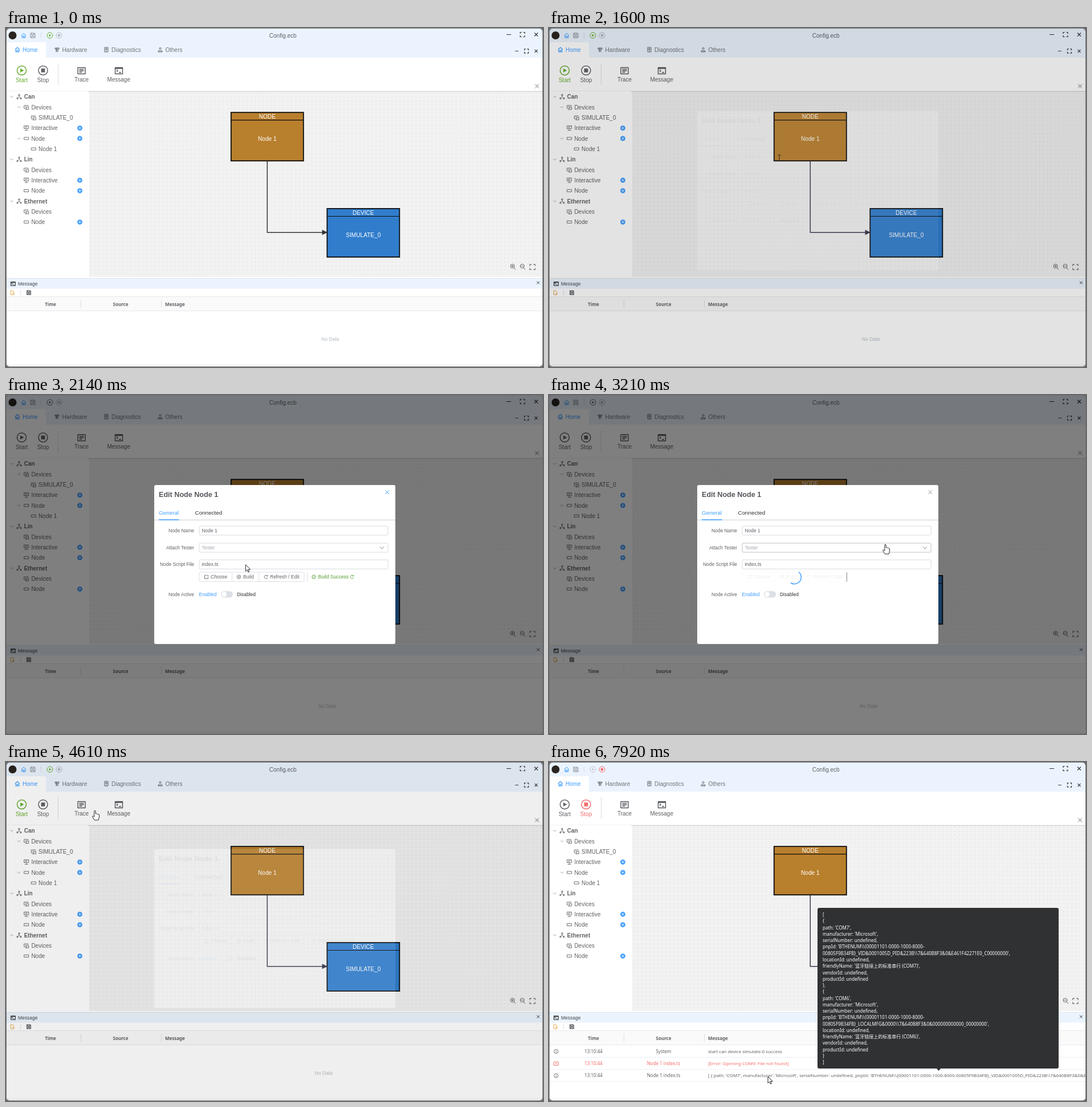
These frames come from a looping animation (942 px wide and 595 px high, 8000 ms). An HTML page:

```html
<!DOCTYPE html>
<html lang="en">
<head>
<meta charset="utf-8">
<title>Config</title>
<style>
html,body{margin:0;width:100%;height:100%;overflow:hidden;background:#777}
svg{display:block;width:100%;height:100%;font-family:"Liberation Sans",Arial,sans-serif}
.tbl{font-family:"Noto Sans","Noto Sans CJK SC",sans-serif}
.ln{fill:none;stroke:currentColor;stroke-linejoin:round}
</style>
</head>
<body>
<svg id="stage" viewBox="0 0 942 595"></svg>
<script>
const LOOP = 8000;
const BLUE = '#409eff', GREEN = '#67ae2f', RED = '#f56c6c', GRAY = '#606266', DARK = '#303133';
const $ = id => document.getElementById(id);

// ---- markup helpers ----
const esc = s => s.replace(/&/g, '&amp;');
const text = (x, y, s, size = 10, fill = GRAY, more = '') =>
  `<text x="${x}" y="${y + size * .36}" font-size="${size}" fill="${fill}" ${more}>${esc(s)}</text>`;
const mid = (x, y, s, size, fill, more = '') => text(x, y, s, size, fill, 'text-anchor="middle" ' + more);
const rect = (x, y, w, h, fill, more = '') =>
  `<rect x="${x}" y="${y}" width="${w}" height="${h}" fill="${fill}" ${more}/>`;
const line = (d, color, w = 1, more = '') => `<path d="${d}" fill="none" stroke="${color}" stroke-width="${w}" ${more}/>`;
const group = (id, body, more = '') => `<g id="${id}" ${more}>${body}</g>`;

// ---- icons, drawn around 0,0 ----
const ICONS = {
  home: 'M-4 0L0-4 4 0M-3-1V4H3V-1M-1 4V1H1V4',
  save: 'M-4-4H3L4-3V4H-4ZM-2-4V-1H2V-4M-2 4V1H2V4',
  tool: 'M-4-3H3V-1H-4ZM-2-1V4M1-1V4M-1-3V4',
  diag: 'M-3-4H3V4H-3ZM-1-2H1V0H-1ZM-1 2H1',
  user: 'M-1.6-2A1.6 1.6 0 1 0 1.6-2A1.6 1.6 0 1 0-1.6-2M-3.5 4V2H3.5V4Z',
  trace: 'M-6.5-5.5H6.5V5.5H-6.5ZM-4-2.5H4M-4 0H4M-4 2.5H1',
  term: 'M-6.5-5.5H6.5V5.5H-6.5ZM-6.5-4H6.5M-4-2L-2 0-4 2M0 3H4',
  net: 'M0-3V0L-3 3M0 0L3 3M-1-4H1V-2H-1ZM-4 2H-2V4H-4ZM2 2H4V4H2Z',
  dev: 'M-1 2H-4V-3H3V-1M-2 4H0M0 0H4V4H0ZM-2-1H0',
  inter: 'M-4-4H4V1H-4ZM-2-2H2M0 1V3M-3 4H3M-2 0L0-2',
  node: 'M-4-2H4V2H-4Z',
  down: 'M-2.5-1.2L0 1.3 2.5-1.2',
  x: 'M-3-3L3 3M3-3L-3 3',
  min: 'M-4 0H4',
  full: 'M-4-1.5V-4H-1.5M1.5-4H4V-1.5M4 1.5V4H1.5M-1.5 4H-4V1.5',
  pin: 'M-4 4L4-4M-4-4L4 4M-1-3L3 1M-3-1L1 3',
  zin: 'M3-1A3.5 3.5 0 1 0-4-1A3.5 3.5 0 1 0 3-1M2 2L5 5M-2.5-1H1.5M-.5-3V1',
  zout: 'M3-1A3.5 3.5 0 1 0-4-1A3.5 3.5 0 1 0 3-1M2 2L5 5M-2.5-1H1.5',
  file: 'M-3-4H1L3-2V4H-3ZM0 2H4',
  folder: 'M0-3H-3V3H3V0M1-3H3V-1',
  wheel: 'M-3.2 0A3.2 3.2 0 1 0 3.2 0A3.2 3.2 0 1 0-3.2 0M0-1V1.5M-1.5 0H1.5',
  redo: 'M2.5-1.5A2.9 2.9 0 1 0 2.8 1M2.8-3.5V-1.3H.8',
  ok: 'M-3.2 0A3.2 3.2 0 1 0 3.2 0A3.2 3.2 0 1 0-3.2 0M-1.5 0L-.3 1.2 1.7-1',
  info: 'M-3.6 0A3.6 3.6 0 1 0 3.6 0A3.6 3.6 0 1 0-3.6 0M0-2V-1.2M0-.5V2',
  err: 'M-4-3H4V3H-4ZM-1.3-1.3L1.3 1.3M1.3-1.3L-1.3 1.3'
};
const icon = (name, x, y, color = GRAY, w = 1, k = 1) =>
  `<path class="ln" d="${ICONS[name]}" transform="translate(${x} ${y}) scale(${k})" color="${color}" stroke-width="${w}"/>`;
const play = (x, y, r) => `<circle class="ln" cx="${x}" cy="${y}" r="${r}" stroke-width="${r > 6 ? 1.5 : 1}"/>` +
  `<path d="M${x - r * .3} ${y - r * .45}L${x + r * .5} ${y}L${x - r * .3} ${y + r * .45}Z" fill="currentColor"/>`;
const stop = (x, y, r) => `<circle class="ln" cx="${x}" cy="${y}" r="${r}" stroke-width="${r > 6 ? 1.5 : 1}"/>` +
  rect(x - r * .42, y - r * .42, r * .84, r * .84, 'currentColor');

// ---- window parts ----
function header() {
  return rect(1, 1, 940, 51, '#ebf4fe', 'rx="5"') + rect(1, 45, 940, 66, '#fff') + rect(70, 44, 871, 8, '#ebf4fe') +
    rect(1, 25, 69, 28, '#fff', 'rx="3"') +
    '<circle cx="11.5" cy="13" r="7" fill="#2a2420"/>' +
    icon('home', 31, 13, BLUE) + icon('save', 47, 13, '#8a8d93') + line('M61.5 8V18', '#d5dae0') +
    group('miniPlay', play(77, 13, 5)) + group('miniStop', stop(93, 13, 5)) +
    mid(485.7, 13, 'Config.ecb') +
    icon('min', 882, 11.5, DARK) + icon('full', 906, 11.5, DARK, 1.2) + icon('x', 930, 11.5, DARK, 1.1) +
    icon('min', 896, 40.5, DARK, 1.2, .75) + icon('full', 913, 40.5, DARK, 1.2, .9) + icon('x', 930, 40.5, DARK, 1.3, .85) +
    icon('home', 20, 38, BLUE, 1.1) + text(29, 38, 'Home', 10, BLUE) +
    icon('tool', 90, 38) + text(98.5, 38, 'Hardware', 10.1, '#73767a') +
    icon('diag', 176, 38) + text(185, 38, 'Diagnostics', 10, '#73767a') +
    icon('user', 270.5, 38) + text(279.5, 38, 'Others', 10, '#73767a') +
    group('start', play(27.5, 74.5, 8) + mid(27.5, 91.5, 'Start', 10, 'currentColor')) +
    group('stop', stop(65, 74.5, 8) + mid(65, 91.5, 'Stop', 10, 'currentColor')) +
    line('M91.5 62V100', '#dcdfe6') +
    icon('trace', 132.5, 75, '#55575c', 1.4) + mid(132.5, 90.5, 'Trace', 10) +
    icon('term', 198, 75, '#55575c', 1.4) + mid(197.7, 90.5, 'Message', 10) +
    icon('pin', 931.5, 102, '#8a8d93', .8);
}

function sidebar() {
  // depth, icon, label, flags: v = arrow, + = add button
  const rows = [
    [0, 'net', 'Can', 'v'], [1, 'dev', 'Devices', 'v'], [2, 'dev', 'SIMULATE_0', ''], [1, 'inter', 'Interactive', '+'],
    [1, 'node', 'Node', 'v+'], [2, 'node', 'Node 1', ''], [0, 'net', 'Lin', 'v'], [1, 'dev', 'Devices', ''],
    [1, 'inter', 'Interactive', '+'], [1, 'node', 'Node', '+'], [0, 'net', 'Ethernet', 'v'], [1, 'dev', 'Devices', ''],
    [1, 'node', 'Node', '+']];
  return rect(1, 111, 143, 328, '#fff') + rows.map(([d, ic, label, f], i) => {
    const y = 120.6 + i * 18.33, x = 23 + d * 12.7;
    return (f.includes('v') ? icon('down', x - 13, y, '#a0a3a9') : '') + icon(ic, x, y, GRAY, .9) +
      text(x + 8.7, y, label, 10, GRAY, d ? '' : 'font-weight="bold"') +
      (f.includes('+') ? `<circle cx="129.5" cy="${y}" r="4.4" fill="${BLUE}"/>` + line(`M127 ${y}H132M129.5 ${y - 2.5}V${y + 2.5}`, '#fff', .8) : '');
  }).join('');
}

const block = (x, y, fill, head, name) =>
  rect(x, y, 127, 85, fill, 'stroke="#0c0c0c" stroke-width="1.8"') + line(`M${x} ${y + 13.5}H${x + 127}`, '#0c0c0c', 1.2) +
  mid(x + 63.5, y + 7, head, 10.1, '#fff') + mid(x + 63.5, y + 46.6, name, 10.1, '#fff');

function canvas() {
  return rect(144, 111, 797, 328, '#fff') + rect(146, 112, 795, 325, '#f2f2f2') + rect(146, 112, 795, 325, 'url(#dots)') +
    line('M1 111.3H941', '#c4c4c4') + line('M143.5 112V439', '#dcdfe6') +
    `<g id="link">${line('M458.3 233V358.8H556', 'currentColor', 1.5)}<path d="M554.5 354.3L564 358.8L554.5 363.3Z" fill="currentColor"/></g>` +
    block(394.8, 148.2, '#b87f2d', 'NODE', 'Node 1') + block(563.3, 317, '#317dcc', 'DEVICE', 'SIMULATE_0') +
    group('bounds', rect(387, 140, 143, 101, 'none', 'stroke="#33334f" stroke-width=".6" stroke-dasharray="3.5 3.5"')) +
    icon('zin', 889, 419, GRAY) + icon('zout', 906, 419, GRAY) + icon('full', 923.5, 419.5, GRAY, 1, 1.15);
}

const PORT = "BTHENUM\\\\{00001101-0000-1000-8000-";
const TAIL = "00805F9B34FB}_VID&0001005D_PID&223B\\\\7&640B8F3&0&E461F42271E0_C00000000'";

function messages() {
  const row = (id, y, ic, color, source, msg) => group(id, icon(ic, 12.5, y, color, .9) +
    mid(78, y, '13:10:44', 8, color) + mid(201, y, source, 8, color) + text(279, y, msg, 7.95, color) +
    line(`M1 ${y + 10.3}H941`, '#ebeef5'));
  return rect(1, 439, 940, 155, '#fff') + rect(1, 440, 940, 17.5, '#ebf4fe') + line('M1 439.5H941', '#dfe3e8') +
    icon('term', 12.5, 449, DARK, 1.8, .6) + text(21, 449, 'Message', 8.5, '#45474c') + icon('x', 933.5, 447, DARK, 1.2, .8) +
    icon('file', 11, 464.5, '#e6a23c', 1, .9) + line('M25.5 460V469', '#dcdfe6') + icon('save', 40, 464.5, '#55575c', 1.4, .85) +
    rect(1, 472, 940, 25, '#fafafa') + line('M1 471.5H941M1 496.5H941', '#e6e8ee') + line('M131.5 477V491M272.5 477V491', '#dcdfe6') +
    '<g class="tbl">' + mid(78, 485, 'Time', 8, GRAY, 'font-weight="bold"') + mid(201, 485, 'Source', 8, GRAY, 'font-weight="bold"') +
    text(279, 485, 'Message', 8, GRAY, 'font-weight="bold"') +
    row('row0', 508, 'info', GRAY, 'System', 'start can device simulate-0 success') +
    row('row1', 529.3, 'err', RED, 'Node 1 index.ts', '[Error: Opening COM9: File not found]') +
    row('row2', 550.5, 'info', GRAY, 'Node 1 index.ts',
      "[ { path: 'COM7', manufacturer: 'Microsoft', serialNumber: undefined, pnpId: '" + PORT + TAIL + ', locationId: undefined') +
    '</g>' + group('noData', mid(0, 545.5, 'No Data', 8.5, '#b4bcc4')) + line('M1 591.5H941', '#ebeef5');
}

function dialog() {
  const field = (y, label, value, color, id) => text(330, y, label, 8.45, GRAY, 'text-anchor="end"') +
    rect(339, y - 8, 331, 16, '#fff', `rx="2" stroke="#d4d7de" stroke-width=".9" id="${id}"`) + text(343.5, y, value, 8.45, color);
  return rect(260, 158, 423, 279, '#fff', 'rx="3"') + text(268, 174.5, 'Edit Node Node 1', 12.6, '#55575c', 'font-weight="bold"') +
    group('closeX', '<path class="ln" d="M665.5 167.5L672 174M672 167.5L665.5 174"/>') +
    text(268, 206, 'General', 9.9, BLUE) + text(331.5, 206, 'Connected', 9.9, DARK) +
    line('M260 219.3H683', '#d4d7de', 1.2) + line('M268 219H303.5', BLUE, 1.5) +
    field(238, 'Node Name', 'Node 1', GRAY, 'name') + field(268, 'Attach Tester', 'Tester', '#a8abb2', 'tester') +
    icon('down', 659.5, 268, '#a8abb2', .8, 1.4) + field(297.3, 'Node Script File', 'index.ts', GRAY, 'script') +
    rect(339, 311, 184, 16.5, '#fff', 'rx="2" stroke="#dcdfe6"') + line('M396.5 311V327.5M443.5 311V327.5', '#dcdfe6') +
    icon('folder', 351.5, 319.3, GRAY, .9) + text(359, 319.3, 'Choose', 8.5) +
    icon('wheel', 408.5, 319.3, GRAY, .9) + text(416, 319.3, 'Build', 8.5) +
    icon('redo', 456, 319.3, GRAY, .9) + text(463, 319.3, 'Refresh / Edit', 8.5) +
    group('built', line('M528.5 311V328', '#dcdfe6') + icon('ok', 540, 319.3, '#529b2e', .9) +
      text(547.5, 319.3, 'Build Success', 8.5, '#529b2e') + icon('redo', 607, 319.3, '#529b2e', .9)) +
    group('loading', rect(337, 309, 186, 20.5, '#fff', 'opacity=".9"') + line('M522.3 311V328', '#8a8d93') +
      `<circle id="spin" cx="430.5" cy="319.8" r="11.8" pathLength="125.7" fill="none" stroke="${BLUE}" stroke-width="1.5" stroke-linecap="round"/>`) +
    text(330, 348 + 1.7, 'Node Active', 8.45, GRAY, 'text-anchor="end"') + text(338.5, 349.7, 'Enabled', 8.45, BLUE) +
    rect(377, 344.2, 21, 11.4, '#dcdfe6', 'rx="5.7"') + '<circle cx="382.8" cy="349.9" r="4.5" fill="#fff"/>' +
    text(405, 349.7, 'Disabled', 8.45, DARK);
}

function tooltip() {
  const port = (com, tail) => ['{', `path: '${com}',`, "manufacturer: 'Microsoft',", 'serialNumber: undefined,', `pnpId: '${PORT}`,
    tail + ',', 'locationId: undefined,', `friendlyName: '蓝牙链接上的标准串行 (${com})',`, 'vendorId: undefined,', 'productId: undefined'];
  const lines = ['[', ...port('COM7', TAIL), '},',
    ...port('COM6', "00805F9B34FB}_LOCALMFG&0000\\\\7&640B8F3&0&000000000000_00000000'"), '}', ']'];
  return rect(471, 256, 423, 282, DARK, 'rx="3"') + '<path d="M679 537L683.5 542L688 537Z" fill="#303133"/>' +
    lines.map((s, i) => text(480, 268.2 + i * 11.27, s, 8, '#fff')).join('');
}

$('stage').innerHTML =
  `<defs><pattern id="dots" x="148" y="114" width="7.05" height="7.05" patternUnits="userSpaceOnUse">${rect(0, 0, 1, 1, '#cdcdcd')}</pattern>` +
  `<clipPath id="win">${rect(1, 1, 940, 593, '#fff', 'rx="5"')}</clipPath></defs>` +
  rect(0, 0, 942, 595, '#6d6f72') +
  `<g clip-path="url(#win)">` + header() + canvas() + sidebar() + messages() +
  group('overlay', rect(1, 1, 940, 593, '#000', 'opacity=".5"') + group('dialog', dialog())) +
  group('tip', tooltip(), 'class="tbl"') + '</g>' +
  group('arrow', '<path d="M0 0V11.6L2.7 9.1 4.6 13.2 6.3 12.4 4.5 8.5H8.2Z" fill="#fff" stroke="#111" stroke-width=".9"/>') +
  group('hand', '<path d="M-1.2 1Q0-.8 1.2 1V6L2.5 5.6 3.4 6.4 4.6 6.1 5.5 7 6.8 6.9 7.5 8V12L6 17H-.8L-4.3 11.2Q-4.2 9.3-2.6 10L-1.2 11.2Z" fill="#fff" stroke="#111" stroke-width=".9"/>') +
  group('sizer', line('M-2.5-5H2.5M0-5V5M-2.5 5H2.5', '#222', .9));

// ---- motion ----
const clamp = v => Math.max(0, Math.min(1, v));
const smooth = v => (v = clamp(v), v * v * (3 - 2 * v));
// cubic-bezier(.25,.1,.25,1)
function ease(x) {
  x = clamp(x);
  let lo = 0, hi = 1;
  for (let i = 0; i < 20; i++) {
    const s = (lo + hi) / 2, r = 1 - s;
    if (.75 * r * r * s + .75 * r * s * s + s * s * s < x) lo = s; else hi = s;
  }
  const r = 1 - lo;
  return .3 * r * r * lo + 3 * r * lo * lo + lo * lo * lo;
}

// time, x, y of the pointer tip
const PATH = [[60, 907, 600], [620, 440, 190], [900, 404, 228], [1610, 404, 228], [1740, 424, 257], [2350, 419, 313],
  [2920, 420, 315], [3190, 590, 262], [3400, 590, 264], [4100, 667, 169], [4400, 667, 169], [4610, 156, 85], [4950, 30, 80],
  [5250, 30, 80], [5850, 118, 125], [6410, 347, 455], [6700, 346, 513], [6850, 346, 514], [7250, 366, 547], [7560, 366, 547], [7800, 384, 552]];
function pointer(t) {
  let i = PATH.findIndex(p => p[0] > t);
  if (i < 0) return PATH[PATH.length - 1].slice(1);
  if (!i) return PATH[0].slice(1);
  const [t0, x0, y0] = PATH[i - 1], [t1, x1, y1] = PATH[i], k = smooth((t - t0) / (t1 - t0));
  return [x0 + (x1 - x0) * k, y0 + (y1 - y0) * k];
}

const show = (id, on) => $(id).setAttribute('visibility', on ? 'visible' : 'hidden');
const set = (id, name, v) => $(id).setAttribute(name, v);
const between = (t, a, b) => t >= a && t < b;

function draw(t) {
  const opening = ease((t - 1550) / 310), closing = ease((t - 4430) / 310);
  const shade = opening * (1 - closing), panel = opening * (1 - .38 * closing);
  set('overlay', 'opacity', shade);
  set('dialog', 'opacity', panel);
  set('dialog', 'transform', `translate(0 ${-15 * (1 - panel)})`);
  set('closeX', 'color', t < 2900 || between(t, 4050, 4700) ? BLUE : '#909399');
  set('tester', 'stroke', between(t, 3080, 3600) ? '#b6b9c0' : '#d4d7de');

  const busy = between(t, 2900, 3700);
  show('built', !busy);
  show('loading', busy);
  set('loading', 'opacity', clamp((t - 2900) / 200));
  const u = Math.max(0, t - 2760) / 1500 % 1, grow = smooth(u * 2), slide = smooth(u * 2 - 1);
  set('spin', 'stroke-dasharray', `${1 + 89 * grow} 150`);
  set('spin', 'stroke-dashoffset', -40 * grow - 80 * slide);
  set('spin', 'transform', `rotate(${-123 + .18 * (t - 3210)} 430.5 319.8)`);

  const running = t >= 5230;
  set('start', 'color', running || shade > .5 ? GRAY : GREEN);
  set('miniPlay', 'color', running ? '#c0c4cc' : shade > .5 ? GRAY : GREEN);
  set('stop', 'color', running ? RED : GRAY);
  set('miniStop', 'color', running ? RED : '#b4b8bf');
  set('link', 'color', t < 600 ? '#333' : '#33334a');
  show('bounds', between(t, 560, 1550));

  show('noData', t < 5300);
  set('noData', 'transform', `translate(${568.7 - t * .0025} 0)`);
  show('row0', t >= 5300);
  show('row1', t >= 5580);
  show('row2', t >= 5580);
  set('tip', 'opacity', clamp((t - 7640) / 150));

  const at = `translate(${pointer(t).join(' ')})`;
  const kind = between(t, 1350, 1680) ? 'sizer' : between(t, 2300, 5400) ? 'hand' : 'arrow';
  for (const id of ['arrow', 'hand', 'sizer']) {
    set(id, 'transform', at);
    show(id, id === kind && t >= 70);
  }
}

function tick() {
  draw(performance.now() % LOOP);
  requestAnimationFrame(tick);
}
tick();
</script>
</body>
</html>
```
